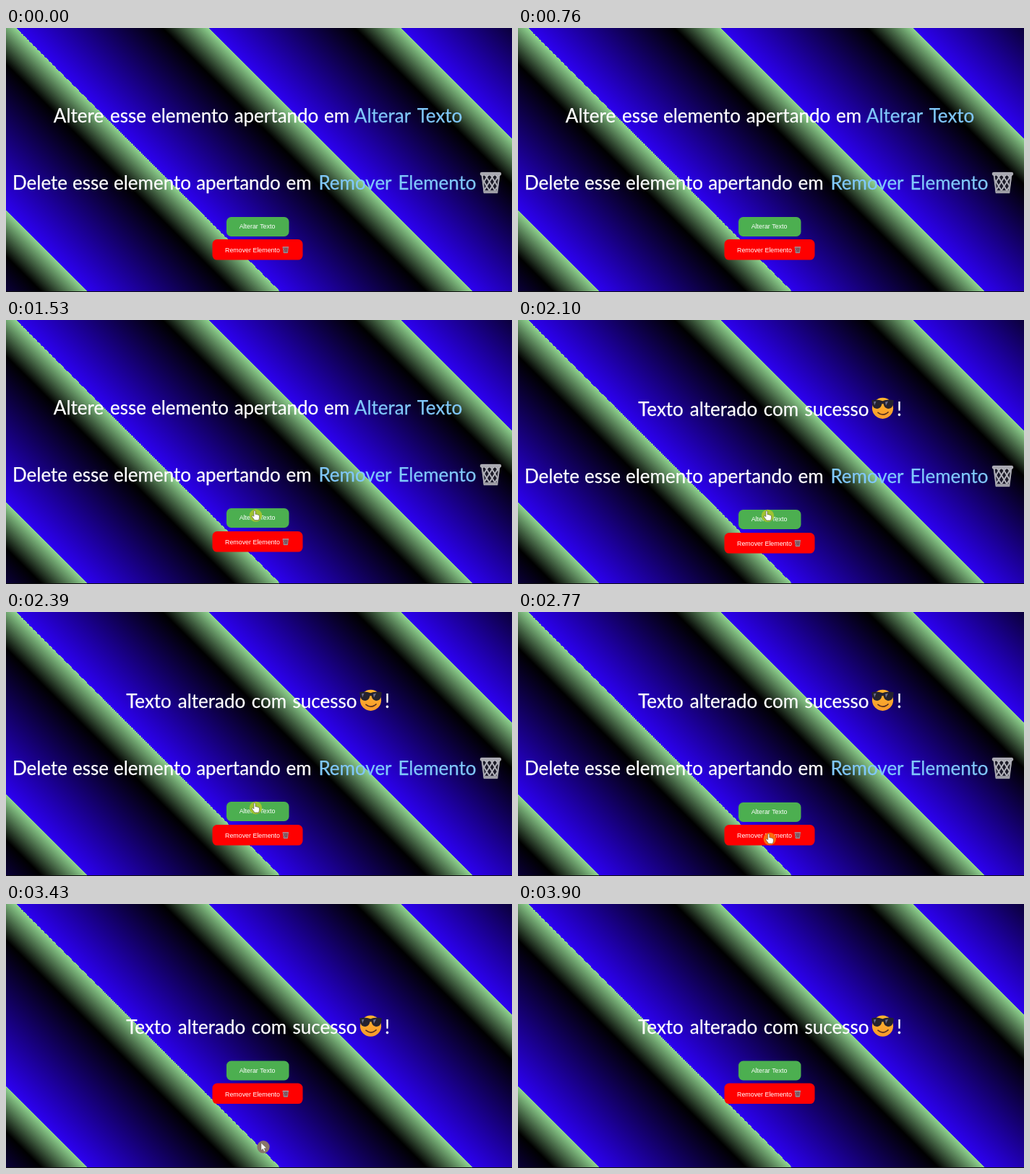
An HTML page for the animation above (4000 ms loop, 700 by 366 pixels).

```html
<!DOCTYPE html>
<html lang="pt">
<head>
<meta charset="utf-8">
<title>Alterar e remover</title>
<style>
  html, body { margin: 0; width: 100%; height: 100%; overflow: hidden; background: #000; }
  svg { display: block; width: 100vw; height: 100vh; }
  .big { font: 26px Lato, sans-serif; fill: #fff; stroke: #fff; stroke-width: .25; text-anchor: middle; }
  .big .hint { fill: #80c8fa; stroke: #80c8fa; }
  .label { font: 8.9px "Liberation Sans", Arial, sans-serif; fill: #fff; }
</style>
</head>
<body>
<svg viewBox="0 0 700 366" preserveAspectRatio="none">
  <defs>
    <linearGradient id="stripes" gradientUnits="userSpaceOnUse" spreadMethod="repeat"
      x1="14" y1="0" x2="147.2" y2="-133.2">
      <stop offset="0" stop-color="#2c00f0"/>
      <stop offset=".76" stop-color="#000"/>
      <stop offset="1" stop-color="#90d490"/>
    </linearGradient>
    <linearGradient id="face" x2="0" y2="1">
      <stop offset="0" stop-color="#ffb62e"/>
      <stop offset="1" stop-color="#f79a2c"/>
    </linearGradient>
    <clipPath id="basket"><path d="M2 3H27L24 29H5Z"/></clipPath>
    <symbol id="bin" viewBox="0 0 29 30" overflow="visible">
      <path d="M2 3H27L24 29H5Z" fill="#24242c" fill-opacity=".75"/>
      <g id="wire" clip-path="url(#basket)" fill="none" stroke="#b4b4bc" stroke-width="1.9"></g>
      <path d="M2.6 4L5.8 28H23.2L26.4 4" fill="none" stroke="#a6a6ae" stroke-width="2"/>
      <path d="M5.2 26.6H23.8" stroke="#9c9ca4" stroke-width="3"/>
      <rect width="29" height="4.4" rx="2" fill="#a8a8b0"/>
    </symbol>
  </defs>

  <rect width="700" height="366" fill="url(#stripes)"/>
  <rect y="365" width="700" height="1" fill="#111"/>

  <g id="ask" class="big"></g>
  <g id="done" class="big">
    <g stroke="none">
      <circle cx="504.5" cy="-10.5" r="14.6" fill="url(#face)"/>
      <path d="M489.3-21.5Q497-23.5 504.5-20.5Q512-23.5 519.7-21.5L519.2-16Q517.5-9.5 511.8-9.8Q506.5-10.5 505.6-16.5H503.4Q502.5-10.5 497.2-9.8Q491.5-9.5 489.8-16Z" fill="#25232f"/>
      <path d="M492-19.5L495.5-20L493.2-14.5ZM508-19L512-20L509-14Z" fill="#6c7090"/>
      <path d="M498-4.5Q505 1.5 512-5" fill="none" stroke="#5c3220" stroke-width="1.7" stroke-linecap="round"/>
    </g>
  </g>
  <g id="remove" class="big">
    <use href="#bin" x="656" y="-24" width="29" height="30"/>
  </g>

  <g id="edit">
    <rect x="305" y="262" width="86.5" height="27" rx="6.5" fill="#4caf50"/>
    <text class="label" x="322.7" y="278">Alterar Texto</text>
  </g>
  <g id="drop">
    <rect x="285.5" y="293" width="125" height="28.6" rx="6.5" fill="#f00"/>
    <text class="label" x="303" y="311">Remover Elemento</text>
    <use href="#bin" x="382.5" y="303.3" width="8.7" height="9"/>
  </g>

  <g id="cursor">
    <circle id="halo" r="8.7"/>
    <path id="hand" fill="#fff" stroke="#333" stroke-width=".5" stroke-linejoin="round"
      d="M-2.6-6.2Q-1.5-7.6-.5-6.2V-1.6Q.6-2.4 1.5-1.3Q2.6-1.8 3.3-.7Q4.7-1 5 .5V3Q4.8 4.6 4 6.6H-1.6Q-3.3 4-5.3 1.5Q-5.5-.2-3.9 .2L-2.6 1.4Z"/>
    <path id="arrow" fill="#fff" stroke="#444" stroke-width=".4"
      d="M-3-5.6V4.6L-.7 2.6L1 6.4L2.8 5.6L1.1 2L4.4 1.8Z"/>
  </g>
</svg>
<script>
const NS = 'http://www.w3.org/2000/svg';
const LOOP = 4000, EDITED = 1910, REMOVED = 3080;
const $ = id => document.getElementById(id);

function add(parent, tag, attrs, text = '') {
  const el = document.createElementNS(NS, tag);
  for (const k in attrs) el.setAttribute(k, attrs[k]);
  el.textContent = text;
  parent.appendChild(el);
}

// each word is centred on its own x
function words(id, list, hintFrom = list.length) {
  list.forEach(([text, x], i) =>
    add($(id), 'text', { x, y: 0, class: i < hintFrom ? '' : 'hint' }, text));
}

words('ask', [['Altere', 100.5], ['esse', 169], ['elemento', 254.5], ['apertando', 374],
  ['em', 457.5], ['Alterar', 521], ['Texto', 600]], 5);
words('done', [['Texto', 197.5], ['alterado', 284.5], ['com', 364], ['sucesso', 441], ['!', 527.5]]);
words('remove', [['Delete', 47], ['esse', 117], ['elemento', 202.5], ['apertando', 321.5],
  ['em', 405], ['Remover', 483], ['Elemento', 596.5]], 5);

for (let x = -16; x < 40; x += 7.5)
  add($('wire'), 'path', { d: `M${x} 3l16 26M${x + 5} 3l-16 26` });

const ramp = (t, a, b) => {
  const p = Math.min(1, Math.max(0, (t - a) / (b - a)));
  return p * p * (3 - 2 * p);
};

// time, x, y of the pointer
const path = [[950, 362, 380], [1430, 345.5, 271], [2400, 345.5, 271.5],
  [2700, 348.3, 314.5], [2980, 348.3, 314.5], [3080, 350.5, 313],
  [3250, 350.5, 313], [3700, 366, 380]];

function pointer(t) {
  let i = 0;
  while (i < path.length - 2 && t > path[i + 1][0]) i++;
  const [a, x, y] = path[i], [b, u, v] = path[i + 1];
  const p = ramp(t, a, b);
  return [x + (u - x) * p, y + (v - y) * p];
}

const move = (id, x, y) => $(id).setAttribute('transform', `translate(${x} ${y})`);
const show = (id, on) => $(id).setAttribute('display', on ? 'inline' : 'none');

function draw(t) {
  const edited = t >= EDITED, removed = t >= REMOVED;
  const [x, y] = pointer(t);
  const shift = removed ? -44.5 : edited ? 2 : 0;
  const lift = ramp(t, 1360, 1480) - ramp(t, 2470, 2560);

  show('ask', !edited);
  show('done', edited);
  show('remove', !removed);
  move('ask', 0, 131);
  move('done', 0, removed ? 179.7 : 132.8);
  move('remove', 0, edited ? 226 : 224);
  move('edit', 0, shift - lift);
  move('drop', 0, shift);

  const onEdit = !removed && y > 261 && y < 290;
  const onDrop = !removed && y > 293 && y < 324;
  show('cursor', t >= path[0][0] && t < path[path.length - 1][0]);
  show('hand', onEdit || onDrop);
  show('arrow', !onEdit && !onDrop);
  $('halo').setAttribute('fill', onEdit ? '#a0c431' : onDrop ? '#ff6a0c' : '#88746a');
  move('cursor', x, y);
}

function tick() {
  draw(performance.now() % LOOP);
  requestAnimationFrame(tick);
}
tick();
</script>
</body>
</html>
```
